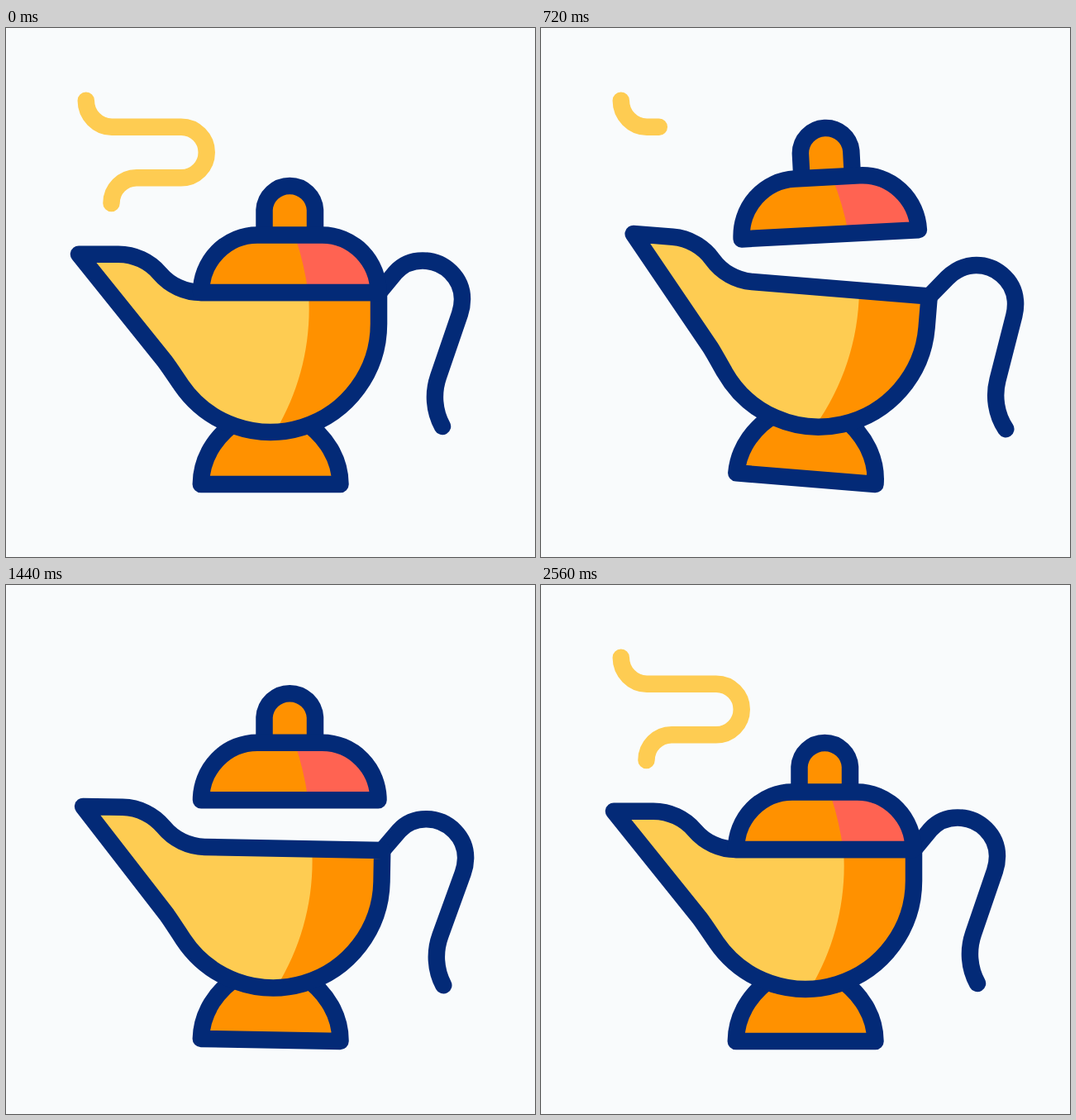
An HTML page for the animation above (3 s loop, 640 by 640 pixels).

```html
<!DOCTYPE html>
<html lang="en">
<head>
<meta charset="utf-8">
<title>Oil lamp</title>
<style>
  html, body { margin: 0; width: 100%; height: 100%; overflow: hidden; background: #f9fbfc; }
  svg { display: block; width: 100vw; height: 100vh; }
  .line { fill: none; stroke: #032a77; stroke-width: 20.5; stroke-linecap: round; stroke-linejoin: round; }
  .orange { fill: #ff9100; }
  .yellow { fill: #fecc52; }
  .red { fill: #ff6352; }
  #smoke { stroke: #fecc52; }
</style>
</head>
<body>
<svg viewBox="0 0 640 640">
  <defs>
    <path id="bowl" d="M88 273.7H136A66 66 0 0 1 186 296.8A66 66 0 0 0 236 320H451V358A131 131 0 0 1 212 432C206.500 424 198 411 192 403Z"/>
    <path id="dome" d="M236 320A68 69.5 0 0 1 304 250.5H382.5A68 69.5 0 0 1 450.5 320Z"/>
    <path id="knob" d="M312.5 250.5V220A30.8 30.8 0 0 1 374 220V250.5"/>
    <path id="foot" d="M235.8 552C236 522 252 494 282 474H358C388 494 404.3 522 404.5 552Z"/>
    <clipPath id="inBowl"><use href="#bowl"/></clipPath>
    <clipPath id="inDome"><use href="#dome"/></clipPath>
  </defs>

  <path id="smoke" class="line" d="M96.8 87.8A31.5 32 0 0 0 128 119.7H212A30.7 30.7 0 0 1 212 181.2H158A30.6 30.8 0 0 0 127.5 212"/>

  <g id="lamp">
    <use href="#foot" class="orange"/>
    <use href="#foot" class="line"/>
    <path id="handle" class="line"/>
    <use href="#bowl" class="orange"/>
    <path class="yellow" clip-path="url(#inBowl)" d="M60 250H366V320C370 380 356 437 326 488L200 500Z"/>
    <use href="#bowl" class="line"/>
  </g>

  <g id="lid">
    <use href="#knob" class="orange"/>
    <use href="#knob" class="line"/>
    <use href="#dome" class="orange"/>
    <path class="red" clip-path="url(#inDome)" d="M349 250Q361 285 365.500 320H460V250Z"/>
    <use href="#dome" class="line"/>
  </g>
</svg>
<script>
const LOOP = 3000, STEP = 40;
const $ = id => document.getElementById(id);
const linear = (t, from, to) => Math.min(1, Math.max(0, (t - from) / (to - from)));
const ease = (t, from, to) => {
  const u = linear(t, from, to);
  return u * u * (3 - 2 * u);
};

const smoke = $('smoke');
const smokeLength = smoke.getTotalLength();

function trim(from, to) {
  const len = (to - from) * smokeLength;
  smoke.style.visibility = len < 0.5 ? 'hidden' : 'visible';
  smoke.style.strokeDasharray = `${len} 1000`;
  smoke.style.strokeDashoffset = -from * smokeLength;
}

// The root of the handle stays put while the rest swings around its neck.
function handlePath(degrees) {
  const a = degrees * Math.PI / 180, px = 484, py = 302;
  const p = (x, y) => {
    const dx = x - px, dy = y - py;
    return [px + dx * Math.cos(a) - dy * Math.sin(a), py + dx * Math.sin(a) + dy * Math.cos(a)];
  };
  return `M452 319L471 296C479 287 ${p(491, 281.5)} ${p(504, 281.5)}` +
    `C${p(531, 281.5)} ${p(552, 303)} ${p(552, 328)}C${p(552, 334)} ${p(551, 340)} ${p(549, 346)}` +
    `L${p(523, 422)}C${p(516.5, 441)} ${p(517.5, 463)} ${p(528, 482)}`;
}

function draw(t) {
  const tilt = 6 * (linear(t, 163, 880) - ease(t, 1200, 1527));
  const swing = Math.sin(2 * Math.PI * linear(t, 390, 1300)) ** 2;
  const lift = 98 * ease(t, 140, 548) - 28 * ease(t, 560, 720) - 70 * ease(t, 1259, 2012);

  $('lamp').setAttribute('transform', `rotate(${tilt} 404.5 552)`);
  $('handle').setAttribute('d', handlePath(-16 * swing));
  $('lid').setAttribute('transform', `translate(0 ${-lift}) rotate(${-5.2 * swing} 343.3 195)`);

  if (t < LOOP * 0.4) trim(0, 1 - ease(t, 248, 905));
  else trim(1 - ease(t, 1442, 2440), 1);
}

const start = performance.now();
function tick() {
  const t = (performance.now() - start) % LOOP;
  draw(Math.floor(t / STEP) * STEP);
  requestAnimationFrame(tick);
}
tick();
</script>
</body>
</html>
```
